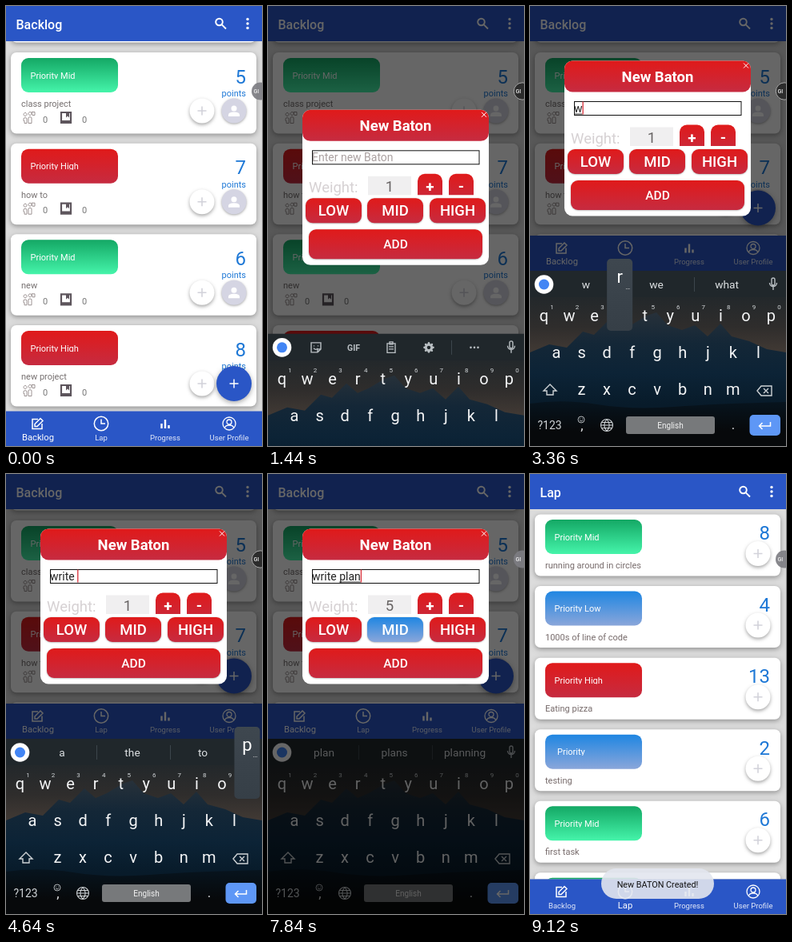
Animation of 320 by 550 pixels, one loop 9600 ms. Source, as an HTML page with a canvas:

```html
<!DOCTYPE html>
<html lang="en">
<head>
<meta charset="utf-8">
<style>
html, body { margin: 0; width: 100%; height: 100%; overflow: hidden; background: #ddd; }
canvas { display: block; width: 320px; height: 550px; }
</style>
</head>
<body>
<canvas></canvas>
<script>
const LOOP = 9600, STEP = 160, BLUE = '#2a56c6', INK = '#1e78d6';
const PILLS = { High: ['#e01a1a', '#c62b40'], Mid: ['#14a865', '#45f4aa'], Low: ['#1f86e2', '#8aa6da'] };
const RED = PILLS.High;
const canvas = document.querySelector('canvas');
const c = canvas.getContext('2d');
const ratio = window.devicePixelRatio || 1;
canvas.width = 320 * ratio;
canvas.height = 550 * ratio;

const clamp = v => Math.max(0, Math.min(1, v));
const ease = (t, from, to) => { const k = clamp((t - from) / (to - from)); return 1 - (1 - k) ** 2; };

function text(str, x, y, size, color, align = 'left', weight = 400) {
  c.font = `${weight} ${size}px Roboto, sans-serif`;
  c.fillStyle = color;
  c.textAlign = align;
  c.fillText(str, x, y);
}
function rect(x, y, w, h, fill) {
  c.fillStyle = fill;
  c.fillRect(x, y, w, h);
}
function vertical(y, h, colors) {
  const g = c.createLinearGradient(0, y, 0, y + h);
  colors.forEach((color, i) => g.addColorStop(i / (colors.length - 1), color));
  return g;
}
function round(x, y, w, h, r, fill) {
  c.beginPath();
  c.roundRect(x, y, w, h, r);
  c.fillStyle = Array.isArray(fill) ? vertical(y, h, fill) : fill;
  c.fill();
}
const disc = (x, y, r, fill) => round(x - r, y - r, 2 * r, 2 * r, r, fill);
function shadowed(blur, dy, draw) {
  c.save();
  c.shadowColor = 'rgba(0,0,0,.35)';
  c.shadowBlur = blur * ratio;
  c.shadowOffsetY = dy * ratio;
  draw();
  c.restore();
}
function clipped(x, y, w, h, draw) {
  c.save();
  c.beginPath();
  c.rect(x, y, w, h);
  c.clip();
  draw();
  c.restore();
}
// Strokes or fills an SVG path placed around (x, y)
function icon(d, x, y, color, width = 1.5, filled) {
  c.save();
  c.translate(x, y);
  c.strokeStyle = c.fillStyle = color;
  c.lineWidth = width;
  const p = new Path2D(d);
  if (filled) c.fill(p); else c.stroke(p);
  c.restore();
}
const ring = r => `M${-r} 0a${r} ${r} 0 1 0 ${2 * r} 0a${r} ${r} 0 1 0 ${-2 * r} 0`;
const PLUS = 'M-5.5 0H5.5M0-5.5V5.5';
const PERSON = 'M-3.5-3a3.5 3.5 0 1 0 7 0a3.5 3.5 0 1 0-7 0M-7 7v-2q0-3.5 7-3.5t7 3.5v2z';
const PEOPLE = 'M-5-2a2 2 0 1 1 .1 0M1-3a2 2 0 1 1 .1 0M-7 1q2-2 4 0v6h-3V4h-1zM-1 7V0q2-2 4 0v7zM3-7H7v4H4z';
const BOOK = 'M-6-6.5H6V6.5H-6zM-6 4.5H6';

function pill(kind, y, label = 'Priority ' + kind, x = 30.5) {
  round(19, y, 121, 43, 9, PILLS[kind]);
  clipped(19, y, 121, 26.3, () => text(label, x, y + 25.5, 11, '#fff'));
}
function card(y, h) {
  shadowed(6, 2, () => round(6, y, 307, h, 7, '#fff'));
}
function plusButton(x, y) {
  shadowed(4, 2, () => disc(x, y, 15.5, '#fff'));
  icon(PLUS, x, y, '#d2d2da', 1.6);
}

function backlogCard(y, kind, name, points) {
  card(y, 101.5);
  pill(kind, y + 7);
  text(name, 19, y + 68, 11, '#767070');
  icon(PEOPLE, 29, y + 81.5, '#938a8a', .9);
  text('0', 49, y + 87.5, 11, '#777', 'center');
  icon(BOOK, 75, y + 81.5, '#5d555c', 2.2);
  icon('M0-6h4v6l-2-2-2 2z', 75, y + 81.5, '#5d555c', 1, true);
  text('0', 98, y + 87.5, 11, '#777', 'center');
  text(points, 300, y + 38.5, 24, INK, 'right');
  text('points', 300, y + 55, 11, INK, 'right');
  plusButton(245, y + 73);
  shadowed(3, 1, () => disc(285, y + 73, 15.5, '#d5d5e3'));
  icon(PERSON, 285, y + 73, '#fff', 1, true);
}
function lapCard(y, kind, name, points, label, x) {
  card(y, 77);
  pill(kind, y + 6.5, label, x);
  text(name, 19, y + 67.5, 11, '#776b6b');
  text(points, 300, y + 31.5, 24, INK, 'right');
  plusButton(285, y + 49);
}

function nav(y, lap) {
  rect(0, y, 320, 44, BLUE);
  [['Backlog', 40], ['Lap', 119], ['Progress', 199], ['User Profile', 279]].forEach(([label, x], i) => {
    const on = i === (lap ? 1 : 0);
    text(label, x, y + 36, on ? 11.2 : 9.5, on ? '#fff' : '#e2e8f8', 'center');
  });
  icon('M1-5.5H-6V6.5H6V0M-3 3.5v-3L4-6.5 7-3.5 0 3.5z', 39, y + 15.5, '#fff', 1.5);
  icon(ring(8.7) + 'M0-5.5V0H5', 119, y + 15.5, '#fff', 1.5);
  icon('M-4.5 6V0M0 6V-5M4.5 6V2', 199, y + 15.5, '#fff', 2.4);
  icon(ring(8) + 'M-3-2a3 3 0 1 0 6 0a3 3 0 1 0-6 0M-5.5 6q0-4 5.5-4t5.5 4', 279, y + 15.5, '#fff', 1.3);
}

function app(t) {
  const lap = t >= 8800;
  const navY = t >= 1600 && t < 8320 ? 287 : 506.5;
  rect(0, 0, 320, 550, '#dcdcdc');
  clipped(0, 44, 320, navY - 44, () => {
    if (lap) {
      lapCard(50.5, 'Mid', 'running around in circles', 8);
      lapCard(140, 'Low', '1000s of line of code', 4);
      lapCard(229.7, 'High', 'Eating pizza', 13);
      lapCard(319.2, 'Low', 'testing', 2, 'Priority', 34);
      lapCard(408.8, 'Mid', 'first task', 6);
      lapCard(498.3, 'Mid', '', '');
    } else {
      card(-56, 101.5);
      backlogCard(58, 'Mid', 'class project', 5);
      backlogCard(171.7, 'High', 'how to', 7);
      backlogCard(285.3, 'Mid', 'new', 6);
      backlogCard(399, 'High', 'new project', 8);
      shadowed(6, 2, () => disc(285, navY - 34.5, 22, BLUE));
      icon(PLUS, 285, navY - 34.5, '#fff', 1.5);
    }
  });
  rect(0, 0, 320, 44, BLUE);
  text(lap ? 'Lap' : 'Backlog', 12.5, 28.5, 16, '#fff', 'left', 500);
  icon('M-5.8-2a4.3 4.3 0 1 0 8.6 0a4.3 4.3 0 1 0-8.6 0M1.8 1.3L7 6.5', 268, 22, '#fff', 1.9);
  [16.5, 22, 27.5].forEach(y => disc(302, y, 1.7, '#fff'));
  nav(navY, lap);
}

// Each key press: character and time; its letter lands one step later
const PRESSES = [...'write plan'].map((ch, i) =>
  [ch, [2880, 3360, 3680, 4000, 4320, 4480, 4640, 4800, 4960, 5440][i]]);
const typed = t => PRESSES.filter(p => t >= p[1] + STEP).map(p => p[0]).join('');

function redButton(label, x, y, w, h, size, fill = RED) {
  shadowed(2, .5, () => round(x, y, w, h, 9, fill));
  text(label, x + w / 2, y + h / 2 + size * .36, size, '#fff', 'center', 500);
}

function dialog(t) {
  const y = 177.5 - 109 * ease(t, 1280, 1920);
  c.save();
  c.globalAlpha = t < 800 ? .5 : t >= 8000 ? .4 : 1;
  round(43, y, 233, 194, 10, '#fff');
  round(43, y, 233, 39, 10, RED);
  text('New Baton', 159.5, y + 26.5, 18.5, '#fff', 'center', 700);
  icon('M-3-3L3 3M3-3L-3 3', 270, y + 6, '#fff', 1);

  c.strokeStyle = '#111';
  c.lineWidth = 1;
  c.strokeRect(55.5, y + 51, 208.5, 17);
  const str = typed(t);
  text(str || 'Enter new Baton', 55, y + 64.5, 14, str ? '#222' : '#aaa0a0');
  const end = str ? 55 + c.measureText(str).width : 55;
  const word = str.split(' ').pop();
  const wordWidth = c.measureText(word).width;
  rect(end - wordWidth, y + 66, wordWidth, 1, '#333');
  const blinkOff = t < 2400 || t >= 6080 && t < 6560 || t >= 7040 && t < 7520;
  if (!blinkOff) rect(end, y + 51, 1.3, 16, '#d8303a');

  const weight = 1 + [6560, 6720, 6880, 7200].filter(at => t >= at).length;
  text('Weight:', 51, y + 103, 18.5, '#d6d1d3');
  rect(125, y + 83, 54, 23.5, '#f0eff0');
  text(weight, 152, y + 102.5, 18.5, '#686464', 'center');
  clipped(180, y + 75, 90, 31.5, () => [['+', 187], ['-', 226]].forEach(([sign, x]) => {
    round(x, y + 80, 31, 36, 9, RED);
    text(sign, x + 15.5, y + 102, 19, '#fff', 'center', 700);
  }));
  redButton('LOW', 47, y + 110.5, 70, 31, 18.5);
  redButton('MID', 124, y + 110.5, 70, 31, 18.5, t >= 7520 ? PILLS.Low : RED);
  redButton('HIGH', 202, y + 110.5, 70, 31, 18.5);
  redButton('ADD', 51, y + 149.5, 217, 37, 15.5);
  c.restore();
}

const ROWS = [['qwertyuiop', 17.5, 63], ['asdfghjkl', 33, 109], ['zxcvbnm', 64.5, 155]];

// Dusk sky, a dark blue mountain range and a black tree line
function landscape() {
  rect(0, 0, 320, 219, vertical(33, 75, ['#23282b', '#2f2d2c', '#453c36']));
  icon('M0 102L24 92 46 96 66 76 80 80 98 62 112 74 126 68 146 56 158 52 172 68 190 74 206 68 222 82 238 66 252 82 274 88 296 98 320 102V219H0z',
    0, 0, vertical(52, 115, ['#27313a', '#142737', '#0c2336', '#081b2a']), 1, true);
  icon('M0 166Q40 160 84 167T180 170T320 164V219H0z', 0, 0, vertical(160, 40, ['#071520', '#07090b']), 1, true);
}

function suggestions(str) {
  if (!str) return null;
  const word = str.split(' ').pop();
  if (!word) return ['a', 'the', 'to'];
  if (word === 'w') return ['w', 'we', 'what'];
  if (word === 'p') return ['p', 'please', 'plan'];
  return word[0] === 'w' ? [word, 'write', 'writing'] : [word, word === 'plan' ? 'plans' : 'plan', 'planning'];
}

function keyboard(t) {
  const down = t >= 8000 ? ease(t, 8000, 8480) : 1 - ease(t, 1120, 1920);
  if (down >= 1) return;
  const soft = '#b9bfc3';
  c.save();
  c.translate(0, 331 + 219 * down);
  landscape();
  rect(0, 0, 320, 33, '#20272b');
  disc(17.5, 17, 11.8, '#fff');
  disc(17.5, 17, 6.5, '#4285f4');
  icon('M-2-6a2 2 0 0 1 4 0v5a2 2 0 0 1-4 0zM-4.5-2a4.5 4.5 0 0 0 9 0M0 3v4', 304, 17, soft, 1.4);

  const words = suggestions(typed(t));
  if (words) {
    words.forEach((w, i) => text(w, 70 + 88 * i, 22, 13.7, '#dde1e3', 'center'));
    [113, 205].forEach(x => rect(x, 8, 1, 18, '#3c464c'));
  } else {
    icon('M-6-6H6V2L2 6H-6zM6 2H2V6M-3-2h1M2-2h1M-3 1q3 3 5 0', 60, 17, soft, 1.4);
    text('GIF', 107, 21, 10.5, soft, 'center', 700);
    icon('M-5-5H5V6.5H-5zM-2-7H2V-4H-2zM-3-1H3M-3 2H3', 154, 17, soft, 1.4);
    icon(ring(3.7), 201, 17, soft, 3);
    for (let i = 0; i < 8; i++) {
      const a = i * Math.PI / 4;
      disc(201 + 5.5 * Math.cos(a), 17 + 5.5 * Math.sin(a), 1.3, soft);
    }
    rect(229, 8, 1, 18, '#3c464c');
    [253.5, 258, 262.5].forEach(x => disc(x, 17, 1.3, soft));
  }

  const pressed = PRESSES.find(p => t >= p[1] && t < p[1] + STEP);
  let popup;
  for (const [keys, x0, y] of ROWS) [...keys].forEach((key, i) => {
    const x = x0 + 31.55 * i;
    text(key, x, y, 20, '#f4f5f6', 'center');
    if (y === 63) text((i + 1) % 10, x + 10, 48, 8, '#d3d7da', 'center');
    if (pressed && pressed[0] === key) popup = [key, x, y];
  });
  icon('M0-7L8 1H4V6H-4V1H-8z', 25, 149, '#ced2d5', 1.4);
  icon('M-9 0L-4-6H9V6H-4zM-1-3L5 3M5-3L-1 3', 293, 150, '#ced2d5', 1.4);
  text('?123', 9.5, 198, 14, '#cfd3d6');
  text(',', 65, 199, 17, '#e4e6e8', 'center');
  icon(ring(4) + 'M-2 1q2 2 4 0M-1.5-1.5v1M1.5-1.5v1', 64, 186, '#c3c7ca', .9);
  icon(ring(7.5) + 'M-7.5 0H7.5M-6.5-3.5H6.5M-6.5 3.5H6.5M0-7.5q-6.5 7.5 0 15M0-7.5q6.5 7.5 0 15', 96, 193, '#ced2d5', 1.1);
  round(120, 182, 111, 22, 3, '#77797b');
  text('English', 175.5, 197, 10, '#f2f2f2', 'center');
  text('.', 254, 198, 17, '#e4e6e8', 'center');
  round(274.5, 180, 38.5, 26, 5, '#5e97f6');
  icon('M7-4V1H-7M-3-3L-7 1-3 5', 293.5, 193, '#fff', 1.5);

  if (popup) {
    const [key, x, y] = popup;
    round(x - 16, y - 78, 32, 90, 5, ['#3e474f', '#363f47']);
    text(key, x, y - 48, 22, '#fff', 'center');
    text('…', x + 10, y - 40, 9, '#ddd', 'center');
  }
  c.restore();
}

function dimAt(t) {
  if (t < 640 || t >= 8160) return 0;
  if (t < 960) return t < 800 ? .35 : .58;
  return t < 8000 ? .6 : .3;
}

function toast(t) {
  if (t < 8480) return;
  c.save();
  c.globalAlpha = t < 8640 ? .5 : .9;
  round(89, 493, 141, 38, 19, '#e3e6ef');
  c.globalAlpha = 1;
  text('New BATON Created!', 159.5, 516.5, 10.8, '#111', 'center');
  c.restore();
}

function draw(t) {
  c.setTransform(ratio, 0, 0, ratio, 0, 0);
  const closing = t >= 7840;
  app(t);
  if (closing) keyboard(t);
  rect(0, 0, 320, 550, `rgba(0,0,0,${dimAt(t)})`);
  if (!closing) keyboard(t);
  if (t >= 640 && t < 8160) dialog(t);
  toast(t);

  const dark = t >= 640 && !closing;
  disc(318, 106.5, 11, dark ? '#2c2c2c' : 'rgba(125,125,130,.92)');
  if (dark) icon(ring(10.7), 318, 106.5, '#bbb', .9);
  text('GI', 309.5, 109, 7, '#eee', 'left', 500);
}

function tick() {
  const t = performance.now() % LOOP;
  draw(Math.floor(t / STEP) * STEP);
  requestAnimationFrame(tick);
}
tick();
</script>
</body>
</html>
```
